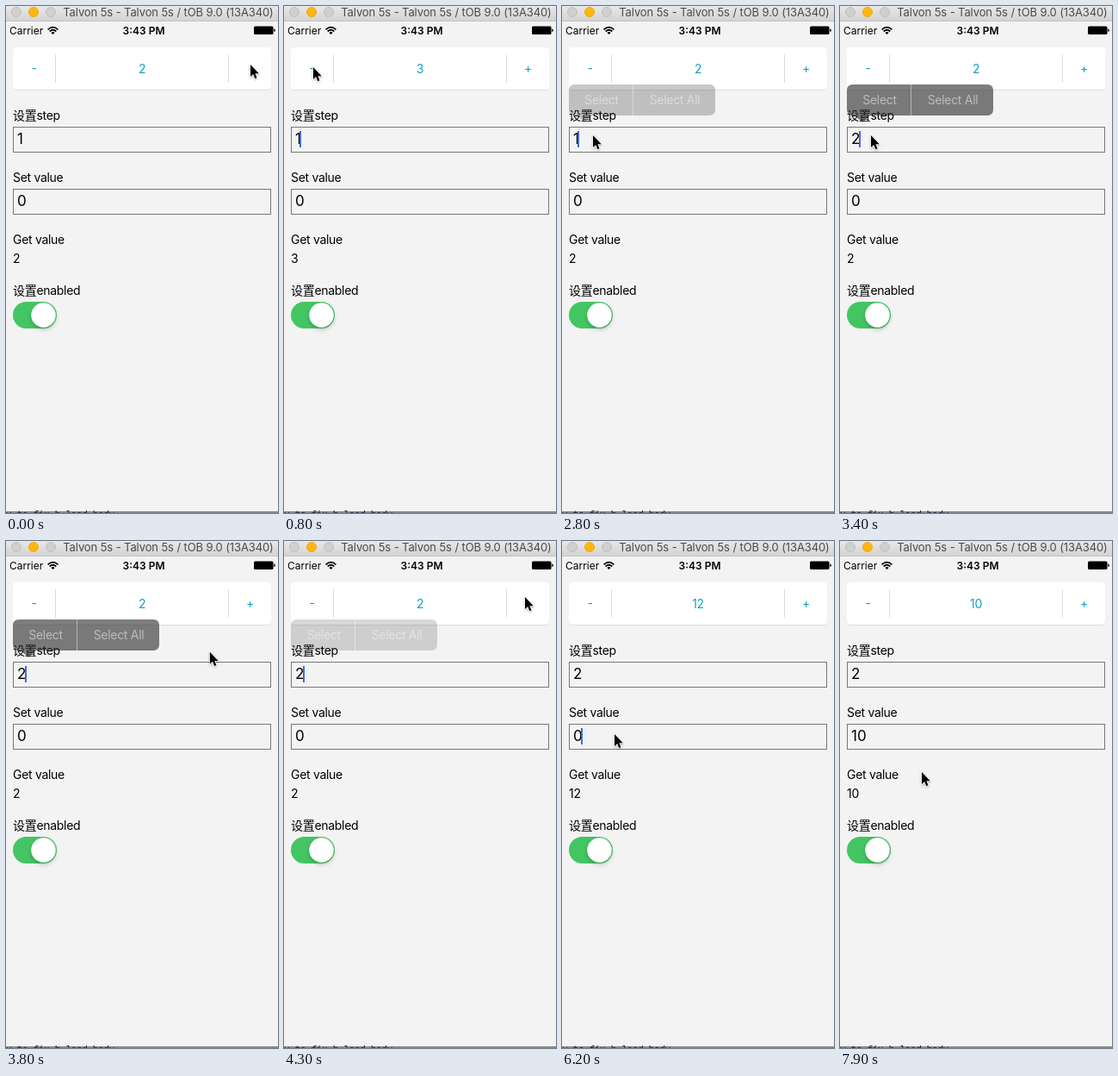
An HTML page for the animation above (8 s loop, 316 px wide and 588 px high).

```html
<!DOCTYPE html>
<html lang="en">
<head>
<meta charset="utf-8">
<title>Stepper demo</title>
<style>
  html, body { margin: 0; width: 100%; height: 100%; overflow: hidden; background: #f3f3f3; }
  svg { display: block; width: 316px; height: 588px; }
  text { font: 14px Inter, "Noto Sans CJK SC", "Noto Sans CJK", sans-serif; letter-spacing: -.3px; white-space: pre; }
  .mid { text-anchor: middle; }
  .title { font-size: 13px; fill: #4b4b4b; letter-spacing: -.1px; }
  .status { font-size: 12px; letter-spacing: 0; }
  .bold { font-weight: 600; }
  .stepper { fill: #0f9fc0; }
  .input { font-size: 17px; letter-spacing: 0; }
  .behind { font: 11px "Noto Sans Mono", monospace; fill: #1c2150; }
</style>
</head>
<body>
<svg viewBox="0 0 316 588">
  <defs>
    <linearGradient id="bar" x2="0" y2="1">
      <stop stop-color="#e8e8e8"/><stop offset="1" stop-color="#d2d2d2"/>
    </linearGradient>
    <filter id="soft" x="-50%" y="-50%" width="200%" height="200%">
      <feDropShadow dx="0" dy="2.5" stdDeviation="2.5" flood-opacity=".22"/>
    </filter>
    <filter id="cursorShadow" x="-50%" y="-50%" width="200%" height="200%">
      <feDropShadow dx="0" dy="1" stdDeviation=".8" flood-opacity=".35"/>
    </filter>
  </defs>

  <rect width="316" height="588" fill="#f3f3f3"/>
  <rect width="316" height="18" fill="url(#bar)"/>
  <path d="M0 17.5H316" stroke="#c4c4c4"/>
  <g stroke="#c0c0c0" fill="#d0d0d0">
    <circle cx="12" cy="7" r="5.5"/>
    <circle cx="32" cy="7" r="5.5" fill="#fdb60d" stroke="#f0ab14"/>
    <circle cx="52" cy="7" r="5.5"/>
  </g>
  <text class="title mid" x="188.5" y="12">Talvon 5s - Talvon 5s / tOB 9.0 (13A340)</text>

  <text class="status" x="4" y="33">Carrier</text>
  <g fill="none" stroke="#000" stroke-width="1.7">
    <path d="M48.6 27.3Q54.5 21.9 60.4 27.3M50.7 29.5Q54.5 26 58.3 29.5"/>
    <path d="M52.4 30.9Q54.5 29.2 56.6 30.9L54.5 33z" fill="#000" stroke="none"/>
  </g>
  <text class="status bold mid" x="160" y="33">3:43 PM</text>
  <rect x="288" y="23.5" width="22.5" height="9.5" rx="1.5"/>
  <path d="M311.3 26.3q1.5 .3 1.5 1.9t-1.5 1.9z"/>

  <rect x="8" y="49" width="300" height="49" rx="4" fill="#dedede"/>
  <rect x="8" y="48" width="300" height="49" rx="4" fill="#fff"/>
  <path d="M57.5 56V89M258.5 56V89" stroke="#dcdcdc"/>
  <text id="minus" class="stepper mid" x="32.5" y="77">-</text>
  <text id="amount" class="stepper mid" x="158" y="77.5"></text>
  <text id="plus" class="stepper mid" x="283.5" y="77">+</text>

  <text x="8" y="132">设置step</text>
  <text x="8" y="204">Set value</text>
  <text x="8" y="276">Get value</text>
  <text id="readout" x="8" y="298"></text>
  <text x="8" y="335">设置enabled</text>
  <g fill="none" stroke="#777">
    <rect x="8.5" y="140.5" width="299" height="29"/>
    <rect x="8.5" y="212.5" width="299" height="29"/>
  </g>
  <text id="stepInput" class="input" x="13" y="160"></text>
  <text id="valueInput" class="input" x="13" y="232"></text>
  <rect id="caret" width="2" height="19" fill="#4468e2"/>

  <rect x="8" y="343" width="51" height="31" rx="15.5" fill="#44c563"/>
  <circle cx="43.5" cy="358.5" r="14.2" fill="#fff" filter="url(#soft)"/>

  <rect y="586" width="316" height="2" fill="#8a8a8a"/>
  <text class="behind" x="0" y="593">y to fix h load body</text>

  <g id="menu">
    <path d="M15 91H171q7 0 7 7V120q0 7-7 7H35L26 135L17 127H15q-7 0-7-7V98q0-7 7-7z" fill="#282828" fill-opacity=".6"/>
    <path d="M82.5 91V127" stroke="#b4b4b4"/>
    <g fill="#bcbcbc">
      <text class="mid" x="46" y="114">Select</text>
      <text class="mid" x="131" y="114">Select All</text>
    </g>
  </g>
  <g id="cursor" filter="url(#cursorShadow)">
    <path d="M0 0V14L3.2 11L5.3 16.2L7.5 15.2L5.4 10.2H9.8z" stroke="#fff" stroke-width="1.2" paint-order="stroke"/>
  </g>
</svg>
<script>
const LOOP = 8000, TICK = 100;
const CLICKS_START = 4200, CLICK_TIME = 200, CLICK_COUNT = 5;
const CLICKS_END = CLICKS_START + CLICK_TIME * CLICK_COUNT;
const PLUS_RELEASE = 200, MINUS_RELEASE = 1200;

const cursorStart = { x: 284, y: 68 };
const trips = [
  { start: 200, end: 900, x: 32, y: 72 },
  { start: MINUS_RELEASE, end: 1600, x: 36, y: 150 },
  { start: 3400, end: 4200, x: 280, y: 65 },
  { start: 5300, end: 6100, x: 61, y: 224 },
  { start: 7100, end: 7900, x: 95, y: 268 }
];

const el = id => document.getElementById(id);
const clamp = (v, low, high) => Math.min(high, Math.max(low, v));
const ramp = (t, start, end) => clamp((t - start) / (end - start), 0, 1);
const between = (t, start, end) => t >= start && t < end;

// The hand sweeps sideways first and up or down last.
function cursorAt(t) {
  let { x, y } = cursorStart;
  for (const trip of trips) {
    const k = ramp(t, trip.start, trip.end);
    x += (trip.x - x) * (1 - (1 - k) ** 2.5);
    y += (trip.y - y) * k ** 2;
  }
  return [x, y];
}

function stepText(t) {
  if (t < 3100) return "1";
  return t < 3200 ? "" : "2";
}

function valueText(t) {
  return t < 6500 ? "0" : "10".slice(0, Math.max(0, Math.floor((t - 6700) / TICK)));
}

function amountAt(t) {
  if (t >= 6800) return valueText(t);
  if (between(t, PLUS_RELEASE, MINUS_RELEASE)) return 3;
  return 2 + 2 * clamp(Math.floor((t - CLICKS_START) / CLICK_TIME), 0, CLICK_COUNT);
}

function focusedInput(t) {
  if (between(t, 400, 6100)) return el("stepInput");
  if (between(t, 6200, 7700)) return el("valueInput");
}

const pressOpacity = (t, release) => .2 + .8 * ramp(t, release, release + 600);
const menuOpacity = t => (ramp(t, 2500, 2900) * (1 - ramp(t, 4200, 4500))) ** 3;

function drawCaret(input) {
  const caret = el("caret");
  caret.setAttribute("visibility", input ? "visible" : "hidden");
  if (!input) return;
  const width = input.textContent ? input.getComputedTextLength() : 0;
  caret.setAttribute("x", Math.round(11.5 + width));
  caret.setAttribute("y", input.getAttribute("y") - 15);
}

function draw(t) {
  el("amount").textContent = el("readout").textContent = amountAt(t);
  el("stepInput").textContent = stepText(t);
  el("valueInput").textContent = valueText(t);
  el("minus").setAttribute("opacity", t < 1000 ? 1 : pressOpacity(t, MINUS_RELEASE));
  el("plus").setAttribute("opacity", pressOpacity(t, t > CLICKS_START ? CLICKS_END : PLUS_RELEASE));
  el("menu").setAttribute("opacity", menuOpacity(t));
  el("cursor").setAttribute("transform", `translate(${cursorAt(t)})`);
  drawCaret(focusedInput(t));
}

const start = performance.now();
function frame() {
  const t = (performance.now() - start) % LOOP;
  draw(Math.floor(t / TICK) * TICK);
  requestAnimationFrame(frame);
}
frame();
</script>
</body>
</html>
```
